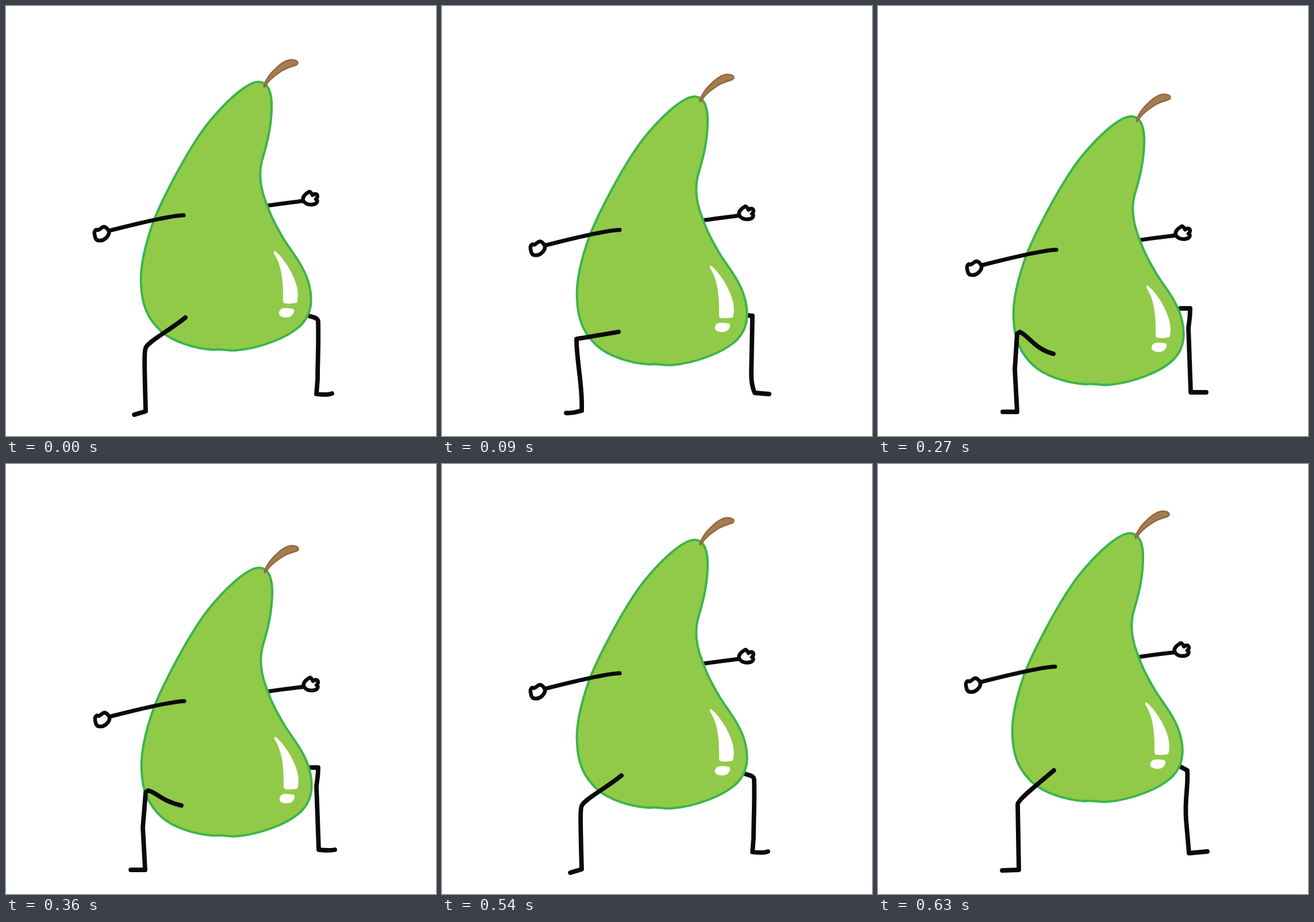
An HTML page for the animation above (720 ms loop, 748 by 748 pixels).

```html
<!DOCTYPE html>
<html lang="en">
<head>
<meta charset="utf-8">
<title>Squatting pear</title>
<style>
html, body { margin: 0; width: 100%; height: 100%; overflow: hidden; background: #fff; }
svg { display: block; width: 100%; height: 100%; }
.limb { fill: none; stroke: #0a0909; stroke-width: 7; stroke-linecap: round; stroke-linejoin: round; }
.leg { stroke-width: 7.8; }
.fist { fill: #fff; stroke-width: 6.5; }
</style>
</head>
<body>
<svg viewBox="0 0 748 748">
  <path id="farLeg" class="limb leg"/>
  <g class="limb body">
    <path d="M450 348C475 344 500 341 518 339"/>
    <path class="fist" d="M526 324C519 328 514 334 518 340C523 346 530 346 535 345C541 344 544 338 539 336C543 333 543 326 537 327L533 329C531 324 528 322 526 324Z"/>
  </g>
  <g class="body">
    <path fill="#91ca48" stroke="#3bb54a" stroke-width="4" d="M440 132C418 131 376 173 349 207C312 256 266 347 254 382C239 426 233 460 235 485C236 520 247 544 268 564C290 585 330 596 360 598C375 596 385 600 400 599C440 596 492 577 514 554C532 535 533 510 528 488C521 455 497 428 484 407C468 380 461 366 452 341C442 315 440 290 445 270C453 243 461 215 462 180C463 155 458 133 440 132Z"/>
    <path fill="#a67c52" stroke="#94663c" stroke-width="2.4" stroke-linejoin="round" d="M449 141C447 137 456 121 468 110C480 98 492 92 501 94C508 95 510 101 504 103C495 106 488 107 478 114C466 122 457 129 453 137Z"/>
    <path fill="#fff" d="M466 426C470 425 486 444 494 459C505 480 511 497 506 516C498 518 490 518 484 517C481 514 482 512 482 505C482 475 479 450 466 430ZM481 526C487 525 495 526 500 527C503 531 499 539 493 541C486 543 476 541 475 536C474 532 477 527 481 526Z"/>
    <g class="limb">
      <path d="M309 364C285 365 222 380 179 391"/>
      <path class="fist" d="M160 390C157 387 153 391 154 397C155 401 155 408 162 408C170 409 177 402 179 396C180 390 174 384 170 384C165 385 163 390 160 390Z"/>
    </g>
  </g>
  <path id="nearLeg" class="limb leg"/>
</svg>
<script>
const STEP = 90;
// Body offset and both legs for each depth of the squat
const poses = {
  top: { at: [-1, -11.5],
    near: "M306 533C280 555 243 584 243 592L245 706L216 707",
    far: "M525 526L538 533C540 565 533 580 536 620L541 677L573 674" },
  high: { at: [0, 0],
    near: "M312 542C285 564 245 585 243 595C240 600 241 630 243 705L223 711",
    far: "M527 539C538 542 543 543 543 550C544 590 542 620 542 650L540 675C548 676 560 677 567 674" },
  mid: { at: [0, 25.5],
    near: "M307 567C280 571 255 576 234 579C234 620 245 660 243 704C237 705 230 709 216 708",
    far: "M528 538L540 539L538 640Q538 660 544 673L569 675" },
  low: { at: [1, 48.5],
    near: "M305 594C270 586 262 571 247 568L243 571L238 632L242 706L217 706",
    far: "M528 528L543 528C543 545 541 550 540 560L544 671C553 672 562 673 572 671" },
  bottom: { at: [1, 60],
    near: "M305 605C275 598 262 574 247 567L242 570L238 632L242 706L217 706",
    far: "M526 526L543 526C543 545 541 550 540 560L544 672L571 672" }
};
const cycle = ["high", "mid", "low", "bottom", "low", "mid", "high", "top"];
const bodies = document.querySelectorAll(".body");
const nearLeg = document.getElementById("nearLeg");
const farLeg = document.getElementById("farLeg");

function draw(time) {
  const pose = poses[cycle[Math.floor(time / STEP) % cycle.length]];
  bodies.forEach(b => b.setAttribute("transform", `translate(${pose.at})`));
  nearLeg.setAttribute("d", pose.near);
  farLeg.setAttribute("d", pose.far);
}

let start;
function tick(now) {
  start ??= now;
  draw(now - start);
  requestAnimationFrame(tick);
}
draw(0);
requestAnimationFrame(tick);
</script>
</body>
</html>
```
